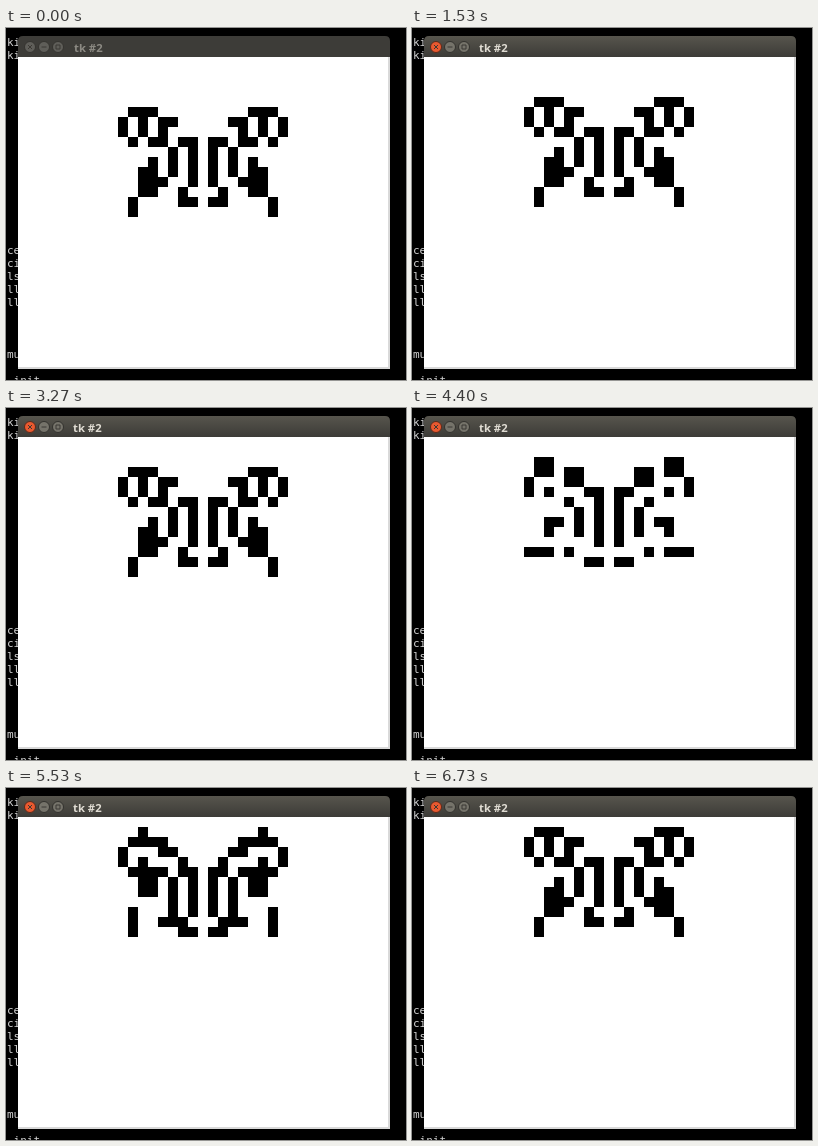
An HTML page for the animation above (6.79 s loop, 400 by 352 pixels).

```html
<!DOCTYPE html>
<html lang="en">
<head>
<meta charset="utf-8">
<title>Game of Life</title>
<style>
  html, body { margin: 0; height: 100%; overflow: hidden; background: #000; }
  svg { display: block; }
  #term { font: 11px "DejaVu Sans Mono", monospace; fill: #d4d4d4; white-space: pre; }
  #title { font: 700 11.3px "Open Sans", sans-serif; fill: #dfdbd2; }
  #close { fill: #e9592f; stroke: #5a2a1c; }
  .dim { fill: #75736a; stroke: #33322e; }
  .sign { fill: none; stroke: #3b3934; }
  .blur #title { fill: #8c8a83; }
  .blur #close, .blur .dim { fill: #5f5e59; stroke: #353430; }
  .blur #bar { fill: #3d3c38; }
</style>
</head>
<body>
<svg id="stage" width="400" height="352" viewBox="0 0 400 352">
  <defs>
    <linearGradient id="shade" x2="0" y2="1">
      <stop offset="0" stop-color="#57554d"/>
      <stop offset="1" stop-color="#3c3b37"/>
    </linearGradient>
  </defs>
  <rect width="400" height="352"/>
  <g id="term"></g>
  <path id="bar" fill="url(#shade)" d="M12 29V13q0-5 5-5H379q5 0 5 5V29z"/>
  <circle id="close" cx="24" cy="19" r="5.5"/>
  <circle class="dim" cx="38" cy="19" r="5.5"/>
  <circle class="dim" cx="52" cy="19" r="5.5"/>
  <path class="sign" d="M22 17l4 4m0-4l-4 4M35.5 19h5M50 17h4v4h-4z"/>
  <text id="title" x="67" y="24">tk #2</text>
  <rect x="12" y="29" width="372" height="312" fill="#d9d9d9"/>
  <rect x="12" y="29" width="370" height="310" fill="#fff"/>
  <path id="cells" shape-rendering="crispEdges"/>
</svg>
<script>
const $ = id => document.getElementById(id);
const LOOP = 6790, TICK = 200 / 3, TICKS_PER_GEN = 8.5;
const COLS = 37, ROWS = 31, CELL = 10, LEFT = 12, TOP = 29;

// Terminal text behind the window: [line, text]
const lines = [[0, "ki"], [1, "ki"], [16, "ce"], [17, "ci"], [18, "ls"],
  [19, "ll"], [20, "ll"], [24, "mu"], [26, " init"]];
$("term").innerHTML = lines.map(([n, s]) =>
  `<text x="1" y="${18 + 13 * n}" xml:space="preserve">${s}</text>`).join("");

// Left half of the spaceship; the right half mirrors it
const half = [
  ".###....", "#.#.##..", "#.#.#...", ".#.##.##", ".....#.#", "...#.#.#",
  "..##.#.#", "..###..#", "..##..#.", ".#....##", ".#......"];

let grid = Array.from({ length: ROWS }, () => Array(COLS).fill(0));
half.forEach((row, r) => [...row].forEach((ch, c) => {
  if (ch === "#") grid[r + 5][c + 10] = grid[r + 5][26 - c] = 1;
}));

function neighbours(g, r, c) {
  let n = -g[r][c];
  for (let y = r - 1; y <= r + 1; y++)
    for (let x = c - 1; x <= c + 1; x++) n += g[y]?.[x] || 0;
  return n;
}

const evolve = g => g.map((row, r) => row.map((alive, c) => {
  const n = neighbours(g, r, c);
  return +(n === 3 || (alive && n === 2));
}));

const outline = g => g.flatMap((row, r) => row.map((alive, c) =>
  alive ? `M${LEFT + c * CELL} ${TOP + r * CELL}h${CELL}v${CELL}h-${CELL}z` : "")).join("");

const gens = [];
for (let i = 0; i < 13; i++, grid = evolve(grid)) gens.push(outline(grid));

const start = performance.now();
let shown = -1;
function draw(now) {
  const t = Math.max(0, now - start) % LOOP;
  const tick = Math.floor((t + 5) / TICK);
  const gen = Math.min(12, Math.ceil((tick + 3) / TICKS_PER_GEN) - 1);
  $("stage").classList.toggle("blur", tick < 1);
  $("title").setAttribute("x", tick < 1 ? 68 : 67);
  if (gen !== shown) $("cells").setAttribute("d", gens[shown = gen]);
  requestAnimationFrame(draw);
}
draw(start);
</script>
</body>
</html>
```
